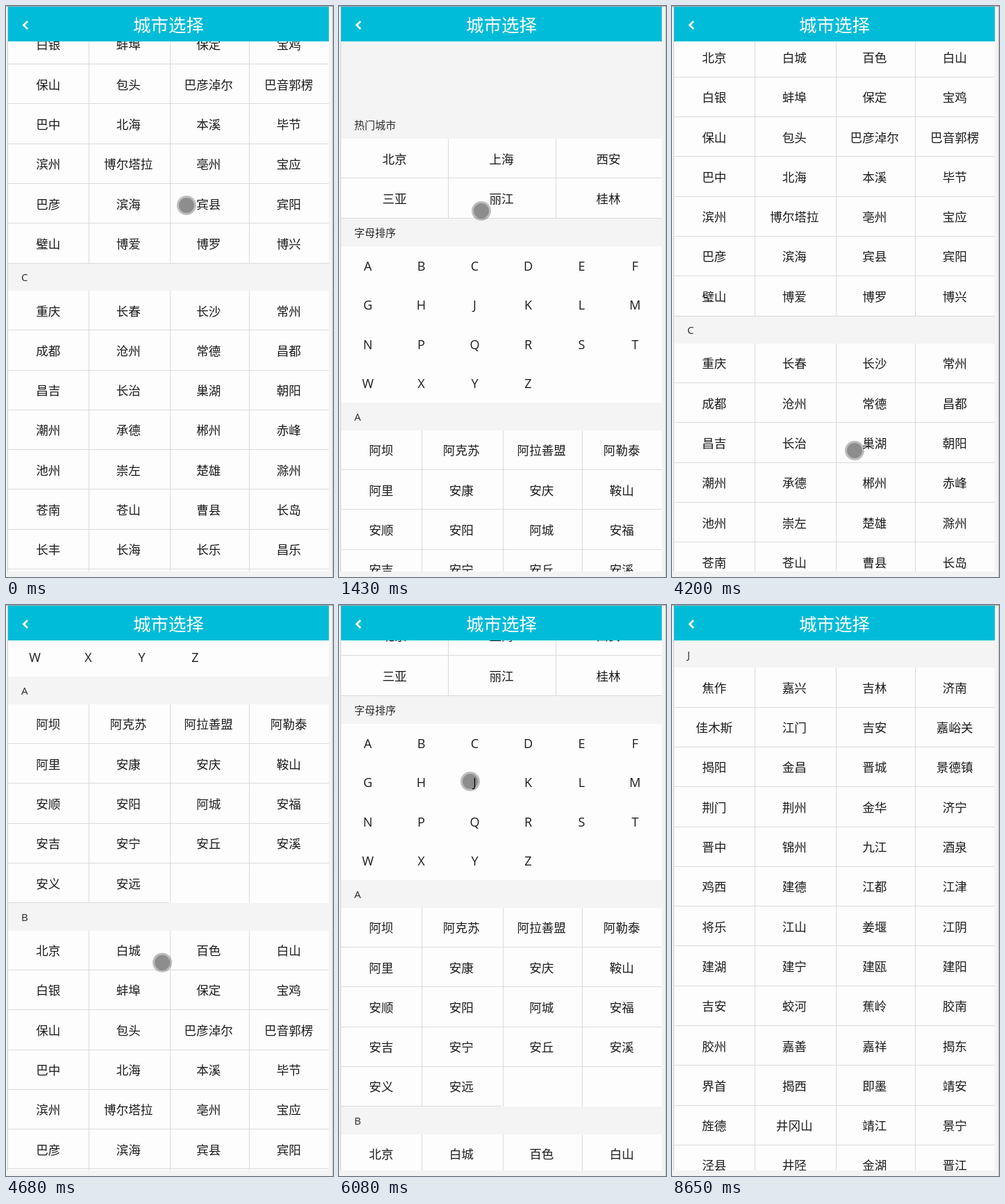
Animation, 471 px wide and 822 px high, one loop 9420 ms. Source, as an HTML page with a canvas:

```html
<!DOCTYPE html>
<html lang="zh-CN">
<head>
<meta charset="utf-8">
<title>城市选择</title>
<style>
  html, body { margin: 0; width: 471px; height: 822px; overflow: hidden; background: #f3f3f3; }
  canvas { display: block; }
</style>
</head>
<body>
<canvas id="stage" width="471" height="822"></canvas>
<script>
const ctx = document.getElementById('stage').getContext('2d');
const LOOP = 9420, STEP = 127;
const TOP = 51, BOTTOM = 814, LEFT = 3, WIDTH = 462;
const ROW = 57.3, BAR = 39.3;
const FONT = '"Noto Sans CJK SC", "Noto Sans CJK", sans-serif';
const LATIN = '"Open Sans", "Noto Sans", sans-serif';

const cities = {
  A: `阿坝 阿克苏 阿拉善盟 阿勒泰 阿里 安康 安庆 鞍山 安顺 安阳 阿城 安福
      安吉 安宁 安丘 安溪 安义 安远`,
  B: `北京 白城 百色 白山 白银 蚌埠 保定 宝鸡 保山 包头 巴彦淖尔 巴音郭楞
      巴中 北海 本溪 毕节 滨州 博尔塔拉 亳州 宝应 巴彦 滨海 宾县 宾阳 璧山 博爱 博罗 博兴`,
  C: `重庆 长春 长沙 常州 成都 沧州 常德 昌都 昌吉 长治 巢湖 朝阳 潮州 承德 郴州 赤峰
      池州 崇左 楚雄 滁州 苍南 苍山 曹县 长岛 长丰 长海 长乐 昌乐 昌黎 长岭 长宁 常宁
      长清 常山 常熟 长泰 长汀 长兴 昌邑 潮安 茶陵 成武 城固 成县 淳安 从化 慈溪 磁县 崇明 崇州 苍梧 岑溪`,
  J: `焦作 嘉兴 吉林 济南 佳木斯 江门 吉安 嘉峪关 揭阳 金昌 晋城 景德镇 荆门 荆州 金华 济宁
      晋中 锦州 九江 酒泉 鸡西 建德 江都 江津 将乐 江山 姜堰 江阴 建湖 建宁 建瓯 建阳
      吉安 蛟河 蕉岭 胶南 胶州 嘉善 嘉祥 揭东 界首 揭西 即墨 靖安 旌德 井冈山 靖江 景宁 泾县 井陉 金湖 晋江`
};

// Stack the city sections below the letter index.
let nextY = 471.5;
const sections = Object.entries(cities).map(([name, list]) => {
  const items = list.split(/\s+/), y = nextY;
  nextY += BAR + Math.ceil(items.length / 4) * ROW;
  return { name, items, y };
});
const anchor = name => TOP - sections.find(s => s.name === name).y;

// Key points of the pointer path: time, x, y.
const pointer = [[0, 260, 287], [762, 195, 240], [1397, 205, 295], [2413, 215, 291],
  [2794, 195, 276], [3300, 195, 276], [3556, 178, 579], [4191, 263, 640],
  [5207, 162, 306], [5969, 189, 254], [7240, 197, 259], [7950, 197, 259], [8509, 344, 790]];

function pointerAt(t) {
  const i = pointer.findIndex(p => p[0] > t);
  if (i < 0) return pointer.at(-1).slice(1);
  const [t0, x0, y0] = pointer[i - 1], [t1, x1, y1] = pointer[i];
  const k = (t - t0) / (t1 - t0);
  return [x0 + (x1 - x0) * k, y0 + (y1 - y0) * k];
}

// Remaining share of an ease-out movement, from 1 down to 0.
const decay = (t, start, duration, power) => Math.max(0, 1 - (t - start) / duration) ** power;

function scrollAt(t) {
  if (t < 1000) return -400 - 467 * decay(Math.min(t, 762), 0, 2000, 5); // fling, then caught
  if (t < 1397) return 100 - 525 * decay(t, 889, 508, 2);                // past the top edge
  if (t < 3040) return 100 * decay(t, 1397, 1270, 4);                    // bounce back
  if (t < 4050) return anchor('C');
  if (t < 7740) return -74.5 - 981 * decay(t, 4040, 2481, 5);            // long fling
  return anchor('J');
}

function rect(x, y, w, h, color) {
  ctx.fillStyle = color;
  ctx.fillRect(x, y, w, h);
}

function text(str, x, y, size, color = '#1c1c1c', align = 'center') {
  const latin = /^[A-Z]$/.test(str);
  ctx.font = `${latin ? 400 : 300} ${size}px ${latin ? LATIN : FONT}`;
  ctx.textAlign = align;
  ctx.fillStyle = color;
  ctx.fillText(str, x, y + size * (latin ? 0.37 : 0.39));
}

function bar(label, y) {
  text(label, 22, y + 20, 15, '#2a2a2a', 'left');
}

function grid(items, y, dividers) {
  const cols = dividers.length + 1, cell = WIDTH / cols;
  const rows = Math.ceil(items.length / cols), top = Math.round(y);
  const height = Math.round(y + rows * ROW) - top;
  rect(LEFT, top, WIDTH, height, '#fdfdfd');
  for (const x of dividers) rect(x, top, 1, height, '#dadada');
  for (let r = 0; r < rows; r++) {
    const row = items.slice(r * cols, (r + 1) * cols);
    rect(LEFT, Math.round(y + (r + 1) * ROW) - 1, cell * row.length, 1, '#dadada');
    row.forEach((name, c) => text(name, LEFT + cell * (c + 0.5), y + (r + 0.5) * ROW, 17.6));
  }
}

function content(dy) {
  ctx.save();
  ctx.beginPath();
  ctx.rect(LEFT, TOP, WIDTH, BOTTOM - TOP);
  ctx.clip();
  rect(LEFT, TOP, WIDTH, BOTTOM - TOP, '#f4f4f4');
  bar('热门城市', 51 + dy);
  grid(['北京', '上海', '西安', '三亚', '丽江', '桂林'], 91 + dy, [157, 312]);
  bar('字母排序', 206 + dy);
  rect(LEFT, Math.round(246 + dy), WIDTH, 225, '#fdfdfd');
  [...'ABCDEFGHJKLMNPQRSTWXYZ'].forEach((letter, i) =>
    text(letter, 41.5 + 77 * (i % 6), 274.2 + 56.4 * Math.floor(i / 6) + dy, 18));
  for (const { name, items, y } of sections) {
    bar(name, y + dy);
    grid(items, y + BAR + dy, [119, 236, 350]);
  }
  ctx.restore();
}

function header() {
  rect(LEFT, 1, WIDTH, TOP - 1, '#00bcd8');
  text('城市选择', 234, 27, 25.5, '#fff');
  ctx.strokeStyle = '#fff';
  ctx.lineWidth = 2.8;
  ctx.beginPath();
  ctx.moveTo(31, 22);
  ctx.lineTo(25.5, 27.5);
  ctx.lineTo(31, 33);
  ctx.stroke();
}

function disc(x, y, radius) {
  ctx.fillStyle = 'rgba(0, 0, 0, 0.25)';
  ctx.beginPath();
  ctx.arc(x, y, radius, 0, 7);
  ctx.fill();
}

function draw(now) {
  const t = Math.floor(now % LOOP / STEP) * STEP; // the screen updates in steps
  rect(0, 0, 471, 822, '#f3f3f3');
  rect(2, 0, 1, BOTTOM, '#d0d0d0');
  rect(470, 0, 1, 822, '#c4c4c4');
  rect(0, 0, 471, 1, '#a8a8a8');
  content(scrollAt(t));
  header();
  if (t < 8600) {
    const [x, y] = pointerAt(t);
    disc(x, y, 14);
    disc(x, y, 11);
  }
}

const began = performance.now();
function tick() {
  draw(performance.now() - began);
  requestAnimationFrame(tick);
}
tick();
</script>
</body>
</html>
```
